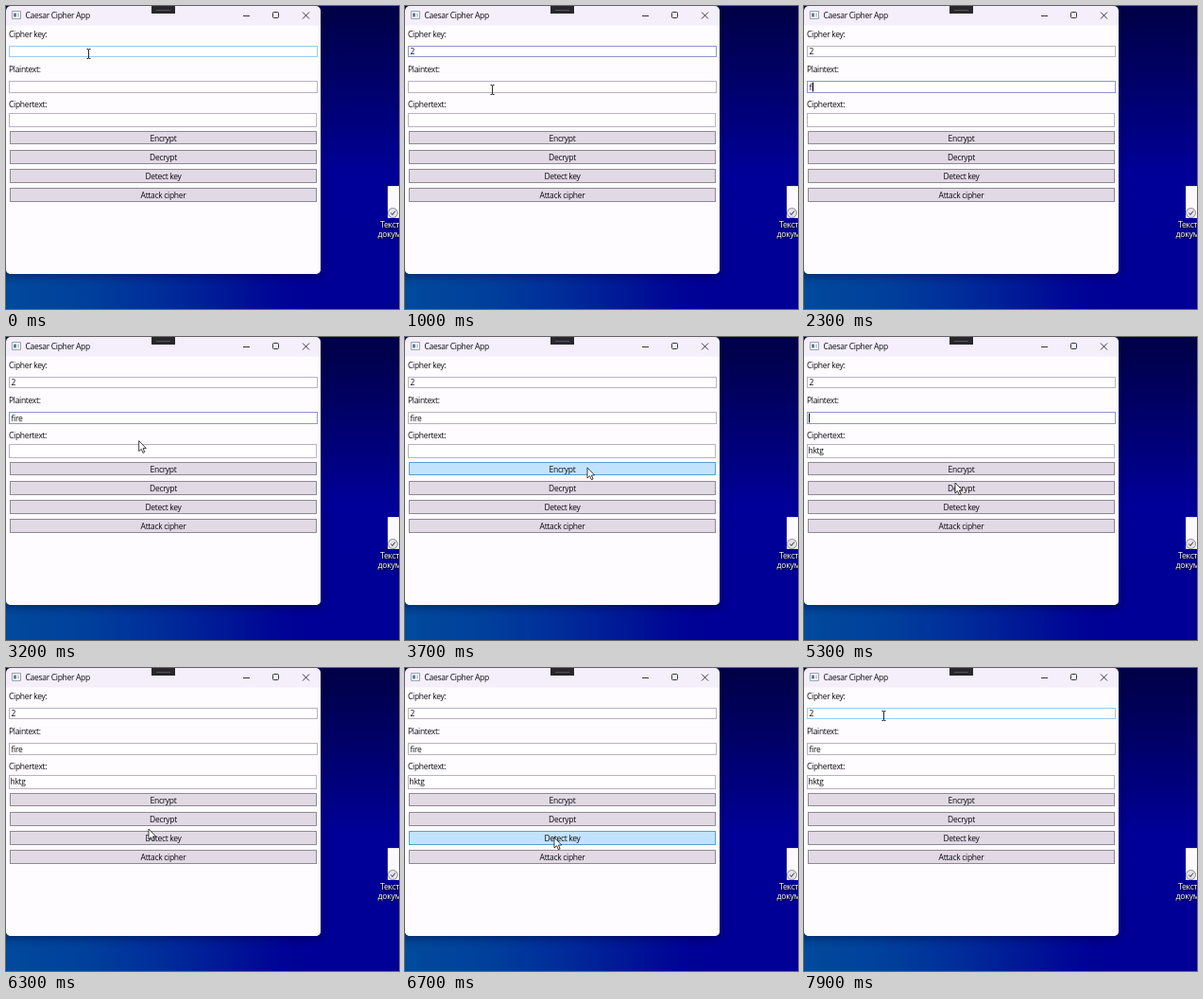
These frames come from a looping animation (416x320 px, 8 s). An HTML page:

```html
<!DOCTYPE html>
<html lang="en">
<head>
<meta charset="utf-8">
<title>Caesar Cipher App</title>
<style>
html, body { margin: 0; width: 100%; height: 100%; overflow: hidden; background: #00004a; }
svg { display: block; width: 416px; height: 320px; }
text { font: 8.5px "Open Sans", "Noto Sans", sans-serif; letter-spacing: -.3px; fill: #0c0a12; white-space: pre; }
.desk { font-size: 8.8px; fill: #fff; text-shadow: 0 1px 1px #000, 0 0 2px #000; }
.mid { text-anchor: middle; }
.line { fill: none; stroke: #222; stroke-width: .9; }
</style>
</head>
<body>
<svg id="stage" viewBox="0 0 416 320">
  <defs>
    <linearGradient id="side" x1="0" y1="0" x2="0" y2="1">
      <stop offset="0" stop-color="#000046"/>
      <stop offset=".25" stop-color="#000069"/>
      <stop offset=".55" stop-color="#000098"/>
      <stop offset="1" stop-color="#000096"/>
    </linearGradient>
    <linearGradient id="floor">
      <stop offset="0" stop-color="#004a9c"/>
      <stop offset=".2" stop-color="#00409c"/>
      <stop offset=".4" stop-color="#002c9a"/>
      <stop offset=".6" stop-color="#001296"/>
      <stop offset=".8" stop-color="#000096" stop-opacity="0"/>
    </linearGradient>
    <filter id="soft" x="-10%" y="-10%" width="120%" height="120%"><feGaussianBlur stdDeviation="5"/></filter>
  </defs>
  <rect width="416" height="320" fill="url(#side)"/>
  <rect y="270" width="416" height="50" fill="url(#floor)"/>
  <rect x="-10" y="2" width="344" height="284" fill="#000020" opacity=".4" filter="url(#soft)"/>

  <path d="M404.5 190.500H418V223.500H404.500Z" fill="#fbfbfd" stroke="#e2e2ea"/>
  <circle cx="409.500" cy="218.500" r="5" fill="#e4e4ea" stroke="#8c8c94"/>
  <path d="M407.500 218.500l1.500 2 3-4" class="line" stroke="#77777f"/>
  <text class="desk" x="396" y="234">Текстовый</text>
  <text class="desk" x="393.500" y="244">документ</text>

  <rect width="333" height="283" rx="5" fill="#f4effb"/>
  <path d="M0 20.500H333V278a5 5 0 0 1 -5 5H5a5 5 0 0 1 -5 -5Z" fill="#fefcff"/>
  <path d="M6.500 5.500H15.500V13.500H6.500Z" fill="#fff" stroke="#98a0ac"/>
  <path d="M8 7.500h3v4h-3z" fill="#5f7f9f"/>
  <path d="M12 7.500h2v4h-2z" fill="#c4ccd6"/>
  <text x="20.500" y="13">Caesar Cipher App</text>
  <path class="line" d="M251 10.500h7M314 6.500l7 7M321 6.500l-7 7"/>
  <rect class="line" x="282.500" y="6.500" width="6" height="6" rx="1"/>
  <path d="M154 0h25v8h-25z" fill="#29272d"/>
  <path d="M159 4.500h15" stroke="#57525c"/>
  <g id="form"></g>
  <path id="caret" stroke="#000" d="M0 0v10"/>
  <path id="arrow" fill="#fff" stroke="#111" stroke-width=".8" stroke-linejoin="round"
        d="M0 0V11L2.600 8.700 4.300 12.700 6.100 11.900 4.400 8H7.700Z"/>
  <path id="beam" fill="none" stroke="#111" stroke-width=".9"
        d="M-2 -4.500H-.5L0 -4 .5 -4.500H2M0 -4V5M-2 5.500H-.5L0 5 .5 5.500H2"/>
</svg>
<script>
const LOOP = 8000, STEP = 100;
const byId = id => document.getElementById(id);
const form = byId("form");

function add(tag, attrs, label = "") {
  const el = document.createElementNS("http://www.w3.org/2000/svg", tag);
  for (const key in attrs) el.setAttribute(key, attrs[key]);
  el.textContent = label;
  return form.appendChild(el);
}

function makeBox(x, y, w, h, fill) {
  return { x, y, w, h, el: add("rect", { x, y, width: w, height: h, fill }) };
}

function makeField(label, x, y, w, h, labelY, textX, textY) {
  add("text", { x: 3, y: labelY }, label);
  const box = makeBox(x, y, w, h, "#fff");
  box.textX = textX;
  box.text = add("text", { x: textX, y: textY });
  return box;
}

function makeButton(label, y, h) {
  const box = makeBox(4.5, y, 324, h, "#e1d9e4");
  add("text", { x: 166.5, y: y + 10, class: "mid" }, label);
  return box;
}

const keyBox = makeField("Cipher key:", 3.5, 42.5, 326, 11, 33, 5.5, 51);
const plainBox = makeField("Plaintext:", 3.5, 79.5, 326, 12, 70, 5.5, 88.5);
const cipherBox = makeField("Ciphertext:", 3.5, 113.5, 325, 14, 107, 4.5, 123);
const fields = [keyBox, plainBox, cipherBox];
const buttons = [
  makeButton("Encrypt", 132.5, 13),
  makeButton("Decrypt", 152.5, 14),
  makeButton("Detect key", 172.5, 14),
  makeButton("Attack cipher", 192.5, 14)
];

// time, x, y
const path = [
  [0, 87, 50], [600, 87, 50], [1000, 92, 88], [1200, 92, 88], [1500, 90, 86],
  [3100, 120, 88], [3400, 182, 153], [3600, 193, 138], [4000, 193, 138],
  [4200, 160, 110], [4500, 92, 86], [5000, 92, 86], [5200, 150, 130],
  [5300, 160, 154], [5500, 161, 164], [5900, 161, 164], [6100, 152, 165],
  [6200, 150, 169.5], [6300, 151, 170], [6500, 156, 190], [6600, 157, 184],
  [6700, 158, 179], [7100, 158, 179], [7400, 118, 92], [7600, 86, 34],
  [7800, 84, 50], [8000, 84, 50]
];

function pointerAt(t) {
  const i = Math.max(1, path.findIndex(p => p[0] >= t));
  const [t0, x0, y0] = path[i - 1], [t1, x1, y1] = path[i];
  const k = Math.max(0, t - t0) / (t1 - t0);
  return { x: x0 + (x1 - x0) * k, y: y0 + (y1 - y0) * k };
}

const within = (t, from, to) => t >= from && t < to;
const inside = (p, b) => p.x >= b.x && p.x <= b.x + b.w && p.y >= b.y && p.y <= b.y + b.h;

function plainText(t) {
  if (t < 2300 || within(t, 5000, 5800)) return "";
  if (t < 2500) return "fire".slice(0, 2 + (t - 2300) / STEP);
  if (within(t, 4700, 5000)) return "fire".slice(0, 3 - (t - 4700) / STEP);
  return "fire";
}

function focusAt(t) {
  if (within(t, 400, 1500)) return [keyBox, 400];
  if (within(t, 1500, 2300)) return [plainBox, 1500];
  if (within(t, 2300, 3600)) return [plainBox, 2300];
  if (within(t, 4500, 5600)) return [plainBox, t < 5000 ? 4500 : 5000];
  return [null, 0];
}

function place(el, p, shown) {
  el.setAttribute("transform", `translate(${p.x} ${p.y})`);
  el.setAttribute("visibility", shown ? "visible" : "hidden");
}

function draw(time) {
  const t = Math.floor((time % LOOP) / STEP) * STEP;
  const pointer = pointerAt(t);
  const settled = pointerAt(Math.max(0, t - STEP));
  const typing = within(t, 600, 700) || within(t, 2300, 3200) || within(t, 4700, 5100);
  const [focus, since] = focusAt(t);

  keyBox.text.textContent = t < 600 ? "" : "2";
  plainBox.text.textContent = plainText(t);
  cipherBox.text.textContent = t < 3800 ? "" : "hktg";

  for (const f of fields) {
    const hot = !typing && inside(settled, f);
    f.el.setAttribute("stroke", f === focus ? "#8f94cc" : hot ? "#9accf0" : "#b9b2c0");
  }
  for (const b of buttons) {
    const hot = !typing && inside(settled, b);
    b.el.setAttribute("fill", hot ? "#c2e3fd" : "#e1d9e4");
    b.el.setAttribute("stroke", hot ? "#5c9ccc" : "#8f8793");
  }

  const caretOn = focus && (t - since) % 1000 < 500;
  const home = focus || keyBox;
  place(byId("caret"), {
    x: Math.round(home.textX + home.text.getComputedTextLength()) - .5,
    y: home.y + 1
  }, caretOn);

  const overField = fields.some(f => inside(pointer, f));
  place(byId("arrow"), pointer, !typing && !overField);
  place(byId("beam"), { x: Math.round(pointer.x) + .5, y: Math.round(pointer.y) }, !typing && overField);
}

const start = performance.now();
function tick() {
  draw(performance.now() - start);
  requestAnimationFrame(tick);
}
tick();
</script>
</body>
</html>
```
